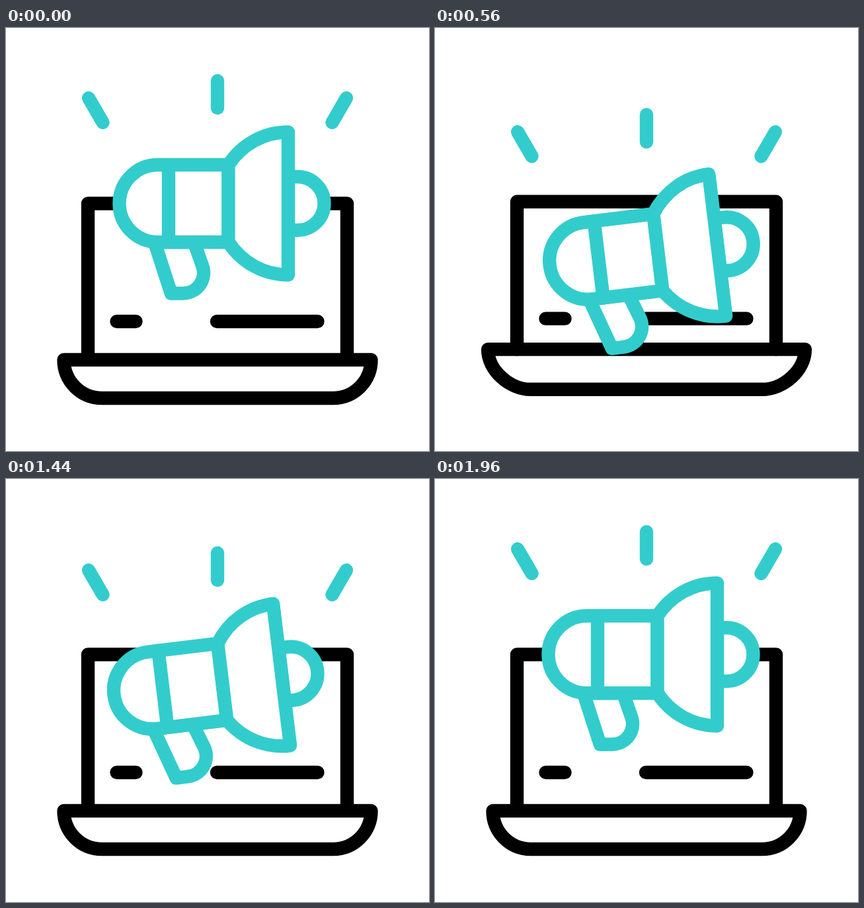
Animation of 640 by 640 pixels, one loop 2000 ms. Source, as an HTML page with a canvas:

```html
<!DOCTYPE html>
<html lang="en">
<head>
<meta charset="utf-8">
<title>Megaphone and laptop</title>
<style>
html, body { margin: 0; width: 100%; height: 100%; overflow: hidden; background: #fff; }
canvas { display: block; width: 640px; height: 640px; }
</style>
</head>
<body>
<canvas id="stage" width="640" height="640"></canvas>
<script>
const ctx = document.getElementById('stage').getContext('2d');
const LOOP = 2000, STEP = 40;
const TEAL = '#33cccc', BLACK = '#000';

// Smooth 0 to 1 between times a and b
function ramp(t, a, b) {
  const u = Math.min(1, Math.max(0, (t - a) / (b - a)));
  return u * u * (3 - 2 * u);
}

// Rises from a to b, falls from b to c
const hump = (t, a, b, c) => ramp(t, a, b) - ramp(t, b, c);

// Two beats while everything else rests
function beat(t) {
  if (t < 840 || t > 1440) return 0;
  return Math.sin(Math.PI * (t - 840) / 300) ** 2;
}

function draw(d, fill) {
  const p = new Path2D(d);
  if (fill) { ctx.fillStyle = '#fff'; ctx.fill(p); }
  ctx.stroke(p);
}

function laptop(t) {
  const jump = hump(t, 100, 400, 650), squash = hump(t, 400, 650, 840);
  const top = 265.5 - 47.5 * jump + 16 * squash;
  const text = 444 - 54 * jump + 16.5 * squash;
  const base = 502 - 48.8 * jump - 2 * squash;
  const low = 560 - 40 * jump - 2 * squash;
  const left = 87.5 - 10.6 * squash, right = 640 - left;

  ctx.strokeStyle = BLACK;
  draw(`M124 ${base}V${top}H516V${base}`);
  draw(`M${left} ${base}H${right}C${right} ${base + 32} 527 ${low} 495 ${low}` +
       `H145C113 ${low} ${left} ${base + 32} ${left} ${base}Z`);
  draw(`M167.5 ${text}H196.5M319 ${text}H471.5`);
}

function rays(t) {
  const y = -41.5 * hump(t, 100, 400, 600) + 62 * hump(t, 400, 600, 800) +
    32 * (ramp(t, 600, 800) - ramp(t, 1490, 1705)) - 58.7 * hump(t, 1490, 1705, 1945);
  const k = 1 - beat(t) / 2;

  ctx.strokeStyle = TEAL;
  for (const side of [-1, 0, 1]) {
    const x = 320 + 195 * side, y0 = y + (side ? 106 : 80);
    const dx = -21.5 * side * k, dy = (side ? 37 : 41) * k;
    draw(`M${x} ${y0}l${dx} ${dy}`);
  }
}

function megaphone(t) {
  const jump = hump(t, 100, 400, 600), land = hump(t, 400, 600, 800);
  const settle = ramp(t, 600, 800);
  const x = -11.2 * jump + 2.4 * land - 9.2 * (settle - ramp(t, 1440, 1760));
  const y = -37.8 * jump + 89 * land + 43.4 * (settle - ramp(t, 1440, 1660)) -
    59 * hump(t, 1440, 1660, 1960);
  const tilt = -6.9 * hump(t, 100, 400, 400.1) - 6.9 * (ramp(t, 400, 400.1) - ramp(t, 1440, 1960));

  ctx.save();
  ctx.translate(320 + x, 265 + y);
  ctx.rotate(tilt * Math.PI / 180);
  ctx.translate(-320, -265);
  ctx.strokeStyle = TEAL;

  // Sound cap, swelling with the beat
  const k = beat(t), cy = 265.5, r = 40.5 + 5 * k;
  const tip = 481.5 + 8 * k, cx = 463.4 + 9 * k, h = 22.4 + 5 * k;
  draw(`M427 ${cy - r}H441C${cx} ${cy - r} ${tip} ${cy - h} ${tip} ${cy}` +
       `C${tip} ${cy + h} ${cx} ${cy + r} 441 ${cy + r}H427Z`, true);

  // Handle, body, band, bell
  draw('M224.7 324L249.8 401.5H268A31 31 0 0 0 297.2 360L284.5 324Z', true);
  draw('M336.5 207H230A58.5 58.5 0 0 0 230 324H336.5Z', true);
  draw('M246 207V324');
  draw('M336.5 207C357 176 390 157.5 427 157.5V373.5C390 373.5 357 355 336.5 324Z', true);
  ctx.restore();
}

function frame(now) {
  const t = Math.floor((now % LOOP) / STEP) * STEP;
  ctx.fillStyle = '#fff';
  ctx.fillRect(0, 0, 640, 640);
  ctx.lineWidth = 20.4;
  ctx.lineCap = ctx.lineJoin = 'round';
  laptop(t);
  rays(t);
  megaphone(t);
}

let start = null;
function tick(now) {
  if (start === null) start = now;
  frame(now - start);
  requestAnimationFrame(tick);
}
frame(0);
requestAnimationFrame(tick);
</script>
</body>
</html>
```
